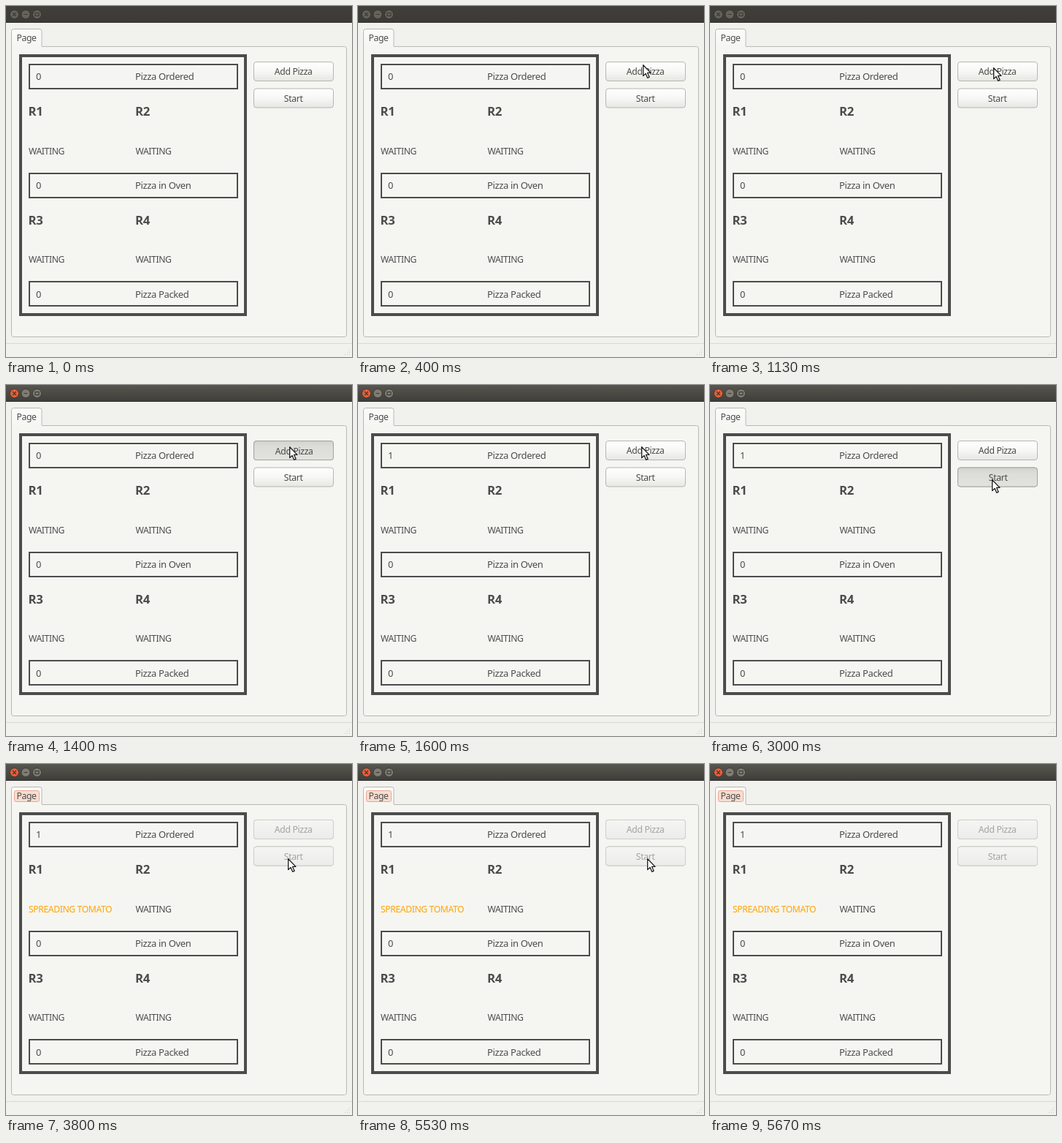
Write an HTML page that moves like this. It is 474x480 px and loops after 8 s.

```html
<!DOCTYPE html>
<html lang="en">
<head>
<meta charset="utf-8">
<title>Pizza line</title>
<style>
  html, body { margin: 0; width: 100%; height: 100%; overflow: hidden; background: #f1f1ee; }
  svg { display: block; width: 474px; height: 480px; }
  text { font: 12.2px "Noto Sans", "Open Sans", sans-serif; letter-spacing: -.4px; fill: #4c4c4c; }
  .big { font-size: 13px; letter-spacing: -.36px; }
  .robot { font-size: 16.8px; font-weight: 700; letter-spacing: -.3px; }
  .label { text-anchor: middle; letter-spacing: -.34px; fill: #484845; }
  .off .label { fill: #a3a3a0; }
  .cook { fill: #ffa500; }

  /* every animation shares one 8 s clock with hard steps */
  .focus, .zero, .one, .press-add, .press-start, .off, .idle, .cook, .cursor {
    animation: 8s step-end infinite;
  }
  .focus { animation-name: focus; }
  .zero { animation-name: zero; }
  .one { animation-name: one; }
  .press-add { animation-name: press-add; }
  .press-start { animation-name: press-start; }
  .off { animation-name: off; }
  .idle { animation-name: idle; }
  .cook { animation-name: cook; }
  .cursor { animation-name: cursor; }

  @keyframes focus { 0% { opacity: 0 } 17.45%, 100% { opacity: 1 } }
  @keyframes zero { 0% { opacity: 1 } 19.125%, 100% { opacity: 0 } }
  @keyframes one { 0% { opacity: 0 } 19.125%, 100% { opacity: 1 } }
  @keyframes press-add { 0% { opacity: 0 } 17.45% { opacity: 1 } 19.125%, 100% { opacity: 0 } }
  @keyframes press-start { 0% { opacity: 0 } 37.45% { opacity: 1 } 39.125%, 100% { opacity: 0 } }
  @keyframes off { 0% { opacity: 0 } 39.125%, 100% { opacity: 1 } }
  @keyframes idle { 0% { opacity: 1 } 47.45%, 100% { opacity: 0 } }
  @keyframes cook { 0% { opacity: 0 } 47.45%, 100% { opacity: 1 } }
  @keyframes cursor {
    0% { opacity: 0; transform: translate(400px, 71px) }
    3.375% { opacity: 1; transform: translate(400px, 71px) }
    4.125% { opacity: 1; transform: translate(393px, 76px) }
    5% { opacity: 1; transform: translate(390px, 80px) }
    7.5% { opacity: 1; transform: translate(389px, 81px) }
    8.375% { opacity: 1; transform: translate(387px, 82px) }
    9.125% { opacity: 1; transform: translate(387px, 83px) }
    10% { opacity: 1; transform: translate(388px, 83px) }
    11.625% { opacity: 1; transform: translate(388px, 84px) }
    25% { opacity: 1; transform: translate(388px, 86px) }
    25.875% { opacity: 1; transform: translate(387px, 94px) }
    26.625% { opacity: 1; transform: translate(385px, 106px) }
    27.5% { opacity: 1; transform: translate(382px, 118px) }
    28.375% { opacity: 1; transform: translate(379px, 127px) }
    29.1% { opacity: 1; transform: translate(378px, 131px) }
    30% { opacity: 1; transform: translate(379px, 132px) }
    30.875% { opacity: 1; transform: translate(381px, 131px) }
    31.625% { opacity: 1; transform: translate(384px, 130px) }
    32.5% { opacity: 1; transform: translate(385px, 129px) }
    33.375% { opacity: 1; transform: translate(386px, 129px) }
    69.125% { opacity: 1; transform: translate(396px, 129px) }
    70% { opacity: 1; transform: translate(416px, 130px) }
    70.85%, 100% { opacity: 0; transform: translate(416px, 130px) }
  }
</style>
</head>
<body>
<svg viewBox="0 0 474 480">
  <defs>
    <linearGradient id="bar" x2="0" y2="1">
      <stop stop-color="#57564f"/><stop offset="1" stop-color="#3e3d38"/>
    </linearGradient>
    <linearGradient id="dim" x2="0" y2="1">
      <stop stop-color="#403f3a"/><stop offset="1" stop-color="#3b3a36"/>
    </linearGradient>
    <linearGradient id="up" x2="0" y2="1">
      <stop stop-color="#fff"/><stop offset=".5" stop-color="#f7f7f5"/><stop offset="1" stop-color="#e6e6e3"/>
    </linearGradient>
    <linearGradient id="down" x2="0" y2="1">
      <stop stop-color="#d2d2ce"/><stop offset=".3" stop-color="#dcdcd8"/><stop offset="1" stop-color="#e2e2de"/>
    </linearGradient>
    <linearGradient id="flat" x2="0" y2="1">
      <stop stop-color="#f5f5f3"/><stop offset="1" stop-color="#ececea"/>
    </linearGradient>
    <linearGradient id="tab" x2="0" y2="1">
      <stop stop-color="#fbfbf9"/><stop offset="1" stop-color="#f5f5f2"/>
    </linearGradient>
    <rect id="btn" x="339.5" y="76.5" width="109" height="26" rx="3.5"/>
    <g id="glyphs" fill="none" stroke="#3a3934" stroke-width="1.1">
      <path d="M9 9l5 5m0-5l-5 5M24.5 11.5h5"/>
      <rect x="40" y="9.5" width="5" height="4"/>
    </g>
  </defs>

  <rect width="474" height="480" fill="#f1f1ee"/>

  <!-- title bar -->
  <rect width="474" height="23" fill="url(#dim)"/>
  <g fill="#65635b" stroke="#33322e" stroke-width=".8">
    <circle cx="11.5" cy="11.5" r="6"/><circle cx="27" cy="11.5" r="6"/><circle cx="42.5" cy="11.5" r="6"/>
  </g>
  <g class="focus">
    <rect width="474" height="23" fill="url(#bar)"/>
    <g fill="#7f7d73" stroke="#36352f" stroke-width=".8">
      <circle cx="11.5" cy="11.5" r="6" fill="#ea5f38"/><circle cx="27" cy="11.5" r="6"/><circle cx="42.5" cy="11.5" r="6"/>
    </g>
  </g>
  <use href="#glyphs"/>
  <path d="M0 22.5h474" stroke="#34332f"/>

  <!-- notebook -->
  <rect x="7.5" y="55.5" width="459" height="397" rx="3" fill="#f5f5f2" stroke="#b9b8b2"/>
  <path d="M7.5 59V34.5q0-3 3-3h35.5q3 0 3 3V55.5" fill="url(#tab)" stroke="#b9b8b2"/>
  <path d="M8 55.5h41" stroke="#f5f5f2"/>
  <rect class="off" x="11.5" y="36.5" width="34" height="15" rx="2" fill="#f8dccf" stroke="#eba78e"/>
  <text x="14.5" y="48">Page</text>

  <!-- status bar -->
  <path d="M0 461.5h474" stroke="#d8d8d4"/>
  <path d="M470 470.5h1M467 473.5h1m2 0h1M464 476.5h1m2 0h1m2 0h1" stroke="#c9c9c4"/>

  <!-- pizza line -->
  <g fill="none" stroke="#4c4c4c">
    <rect x="20" y="68" width="308" height="354" stroke-width="4"/>
    <g stroke-width="2">
      <rect x="32" y="80" width="285" height="33"/>
      <rect x="32" y="229" width="285" height="33"/>
      <rect x="32" y="377" width="285" height="33"/>
    </g>
  </g>
  <g>
    <text class="big zero" x="41" y="101">0</text>
    <text class="big one" x="41" y="101">1</text>
    <text class="big" x="41" y="250">0</text>
    <text class="big" x="41" y="399">0</text>
    <text class="big" x="177" y="101">Pizza Ordered</text>
    <text class="big" x="177" y="250">Pizza in Oven</text>
    <text class="big" x="177" y="399">Pizza Packed</text>
    <text class="robot" x="30.5" y="150">R1</text>
    <text class="robot" x="177" y="150">R2</text>
    <text class="robot" x="30.5" y="299">R3</text>
    <text class="robot" x="177" y="299">R4</text>
    <text class="idle" x="31" y="203">WAITING</text>
    <text class="cook" x="31" y="203">SPREADING TOMATO</text>
    <text x="177.5" y="203">WAITING</text>
    <text x="31" y="351">WAITING</text>
    <text x="177.5" y="351">WAITING</text>
  </g>

  <!-- buttons -->
  <g fill="url(#up)" stroke="#b7b6b0">
    <use href="#btn"/><use href="#btn" y="36.5"/>
  </g>
  <text class="label" x="393.7" y="94">Add Pizza</text>
  <text class="label" x="393.7" y="130.5">Start</text>
  <g class="press-add">
    <use href="#btn" fill="url(#down)" stroke="#a3a29c"/>
    <text class="label" x="394.7" y="94.5">Add Pizza</text>
  </g>
  <g class="press-start">
    <use href="#btn" y="36.5" fill="url(#down)" stroke="#a3a29c"/>
    <text class="label" x="394.7" y="131">Start</text>
  </g>
  <g class="off">
    <g fill="url(#flat)" stroke="#cfcec9">
      <use href="#btn"/><use href="#btn" y="36.5"/>
    </g>
    <text class="label" x="393.7" y="94">Add Pizza</text>
    <text class="label" x="393.7" y="130.5">Start</text>
  </g>

  <path class="cursor" d="M.7 .8V15.6L4.1 12.4L6.7 18.3L9.2 17.2L6.6 11.4H11Z"
        fill="#fff" stroke="#1c1c1c" stroke-width="1.3" stroke-linejoin="round"/>
</svg>
</body>
</html>
```
